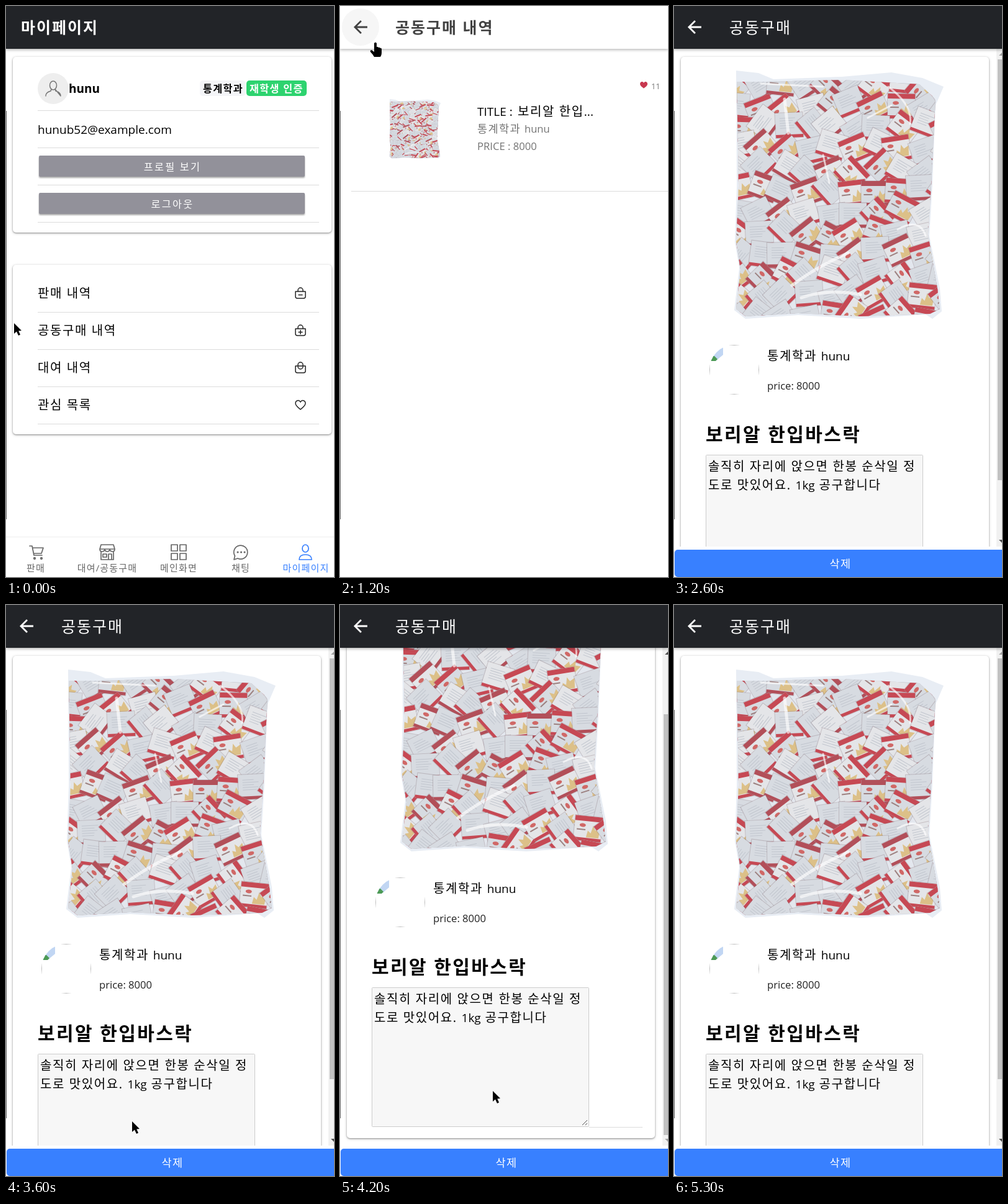
Animation, 528 px wide and 920 px high, one loop 6000 ms. Source, as an HTML page:

```html
<!DOCTYPE html>
<html lang="ko">
<head>
<meta charset="utf-8">
<title>마이페이지</title>
<style>
html, body { margin: 0; width: 100%; height: 100%; overflow: hidden; background: #fff; }
svg { display: block; font: 20px "Open Sans", "Noto Sans CJK KR", sans-serif; }
text { letter-spacing: .08em; white-space: pre; }
.l { font-size: .95em; letter-spacing: 0; }
.b { font-weight: 700; }
.m { text-anchor: middle; }
.btn { letter-spacing: .14em; font-size: 16.25px; fill: #fff; text-anchor: middle; }
.tab { font-size: 15px; text-anchor: middle; }
.card { fill: #fff; filter: drop-shadow(0 1px 1px #0005) drop-shadow(0 1px 2px #0003); }
.bar { filter: drop-shadow(0 2px 2px #0004); }
.grey { fill: #92919a; filter: drop-shadow(0 2px 1px #0005); }
.rule { stroke: #dcdcdc; fill: none; }
.icon { fill: none; stroke: #222; stroke-width: 1.5; stroke-linecap: round; stroke-linejoin: round; }
.tabs { stroke: #666; stroke-width: 1.7; }
</style>
</head>
<body>
<svg width="528" height="920" viewBox="0 0 528 920">
<defs>
  <clipPath id="bag"><path d="M101 122L150 122 270 119 395 126 421 150 414 290 409 368 424 455 428 488 412 496 300 500 200 495 115 500 100 488 107 425 100 380 104 290Z"/></clipPath>
  <clipPath id="round"><circle cx="97" cy="586" r="40"/></clipPath>
  <path id="heart" d="M0 13C-5 9-15 3-15-5C-15-15-4-17 0-9C4-17 15-15 15-5C15 3 5 9 0 13Z"/>
  <path id="back" d="M44 34H24M34 24L24 34L34 44" fill="none" stroke-width="2.8"/>
  <path id="sack" d="M-8-3H8V5Q8 8 5 8H-5Q-8 8-8 5ZM-4-3V-5A4 4 0 0 1 4-5V-3"/>
  <g id="photo">
    <path fill="#e8edf4" d="M100 104L136 108 160 118 270 114 350 107 400 116 434 130 421 160 416 290 411 370 428 455 431 492 416 504 405 497 300 504 200 498 115 504 97 490 105 422 98 380 101 290Z"/>
    <g clip-path="url(#bag)">
      <g id="packs"></g>
      <rect x="96" y="104" width="340" height="400" fill="#d3cfd4" opacity=".22"/>
    </g>
    <g fill="none" stroke="#fff" stroke-linecap="round" opacity=".65">
      <path stroke-width="5" d="M190 450Q230 420 280 398M205 470Q250 455 300 465M178 150L184 205"/>
      <path stroke-width="3" d="M345 130Q385 160 380 190M240 240L250 285M360 360Q395 340 405 370M140 125L240 130M312 180L350 160"/>
    </g>
  </g>
</defs>
<rect width="528" height="920" fill="#fff"/>

<g id="home">
  <rect class="bar" width="528" height="69" fill="#222428"/>
  <text class="b" x="24" y="44" font-size="25" fill="#fff">마이페이지</text>
  <rect class="card" x="11" y="82" width="513" height="283" rx="5"/>
  <rect class="card" x="11" y="417" width="513" height="273" rx="5"/>
  <path class="rule" d="M51 168.5H504M51 228.5H504M51 288.5H504M51 348.5H504M51 493.5H504M51 553.5H504M51 613.5H504M51 673.5H504"/>
  <circle cx="76" cy="133" r="25" fill="#eee"/>
  <g class="icon" style="stroke:#777"><ellipse cx="76" cy="128" rx="5.5" ry="7"/><path d="M64 145Q64 139 72 137L73 134M79 134L80 137Q88 139 88 145Z"/></g>
  <text class="b" x="101" y="140"><tspan class="l">hunu</tspan></text>
  <rect x="312" y="120" width="74" height="25" rx="5" fill="#f4f5f8"/>
  <rect x="387" y="120" width="97" height="25" rx="5" fill="#2dd36f"/>
  <text class="b" x="317" y="139" font-size="16.25">통계학과</text>
  <text class="b" x="392" y="139" font-size="16.25" fill="#fff">재학생 인증</text>
  <text x="51" y="206"><tspan class="l">hunub52@example.com</tspan></text>
  <rect class="grey" x="53" y="241" width="428" height="34" rx="2"/>
  <rect class="grey" x="53" y="301" width="428" height="34" rx="2"/>
  <text class="btn" x="268" y="265">프로필 보기</text>
  <text class="btn" x="268" y="325">로그아웃</text>
  <text x="51" y="470">판매 내역</text>
  <text x="51" y="530">공동구매 내역</text>
  <text x="51" y="590">대여 내역</text>
  <text x="51" y="650">관심 목록</text>
  <g class="icon">
    <g transform="translate(474 463)"><use href="#sack"/><path d="M-3 2.5H3"/></g>
    <g transform="translate(474 523)"><use href="#sack"/><path d="M-3 2.5H3M0-.5V5.5"/></g>
    <g transform="translate(474 583)"><use href="#sack"/><path d="M-4-2A4 4 0 0 0 4-2"/></g>
    <use href="#heart" transform="translate(474 643) scale(.53)" stroke-width="2.8"/>
  </g>
  <path class="rule" d="M0 855.5H528" style="stroke:#eee"/>
  <g class="icon tabs">
    <path d="M38 870H42L45 885H58M43 873H60L57 882H45"/><circle cx="46" cy="890" r="1.3"/><circle cx="57" cy="890" r="1.3"/>
    <path d="M153 868H173L175 875Q175 879 171.500 879T167 876Q166 879 163 879T159 876Q158 879 154.500 879T151 875ZM151 875H175M153 880V892H173V880M156 883H162V888H156ZM165 892V883H170V892"/>
    <path d="M266 868H276V878H266ZM280 868H290V878H280ZM266 882H276V892H266ZM280 882H290V892H280Z"/>
    <path d="M367 892L368.500 886A11 11 0 1 1 373 890Z"/>
    <path d="M373 880H373.100M378.500 880H378.600M384 880H384.100" stroke-width="3"/>
    <g stroke="#3880ff"><ellipse cx="482" cy="874" rx="5" ry="6"/><path d="M472 892Q472 884 482 884T492 892Z"/></g>
  </g>
  <g fill="#666">
    <text class="tab" x="48" y="911">판매</text>
    <text class="tab" x="163" y="911">대여/공동구매</text>
    <text class="tab" x="278" y="911">메인화면</text>
    <text class="tab" x="378" y="911">채팅</text>
    <text class="tab" x="483" y="911" fill="#3880ff">마이페이지</text>
  </g>
</g>

<g id="list">
  <rect width="528" height="920" fill="#fff"/>
  <rect class="bar" width="528" height="69" fill="#fff"/>
  <circle id="hover" cx="33" cy="34" r="30" fill="#f6f6f6"/>
  <use href="#back" stroke="#424242"/>
  <text class="b" x="89" y="44" font-size="25" fill="#424242">공동구매 내역</text>
  <use href="#heart" transform="translate(489 127.500) scale(.4)" fill="#c8384f"/>
  <text x="501" y="134" font-size="13.500" fill="#777"><tspan class="l">11</tspan></text>
  <use href="#photo" transform="translate(55.400 125) scale(.246 .24)"/>
  <text x="221" y="177"><tspan class="l">TITLE :</tspan></text>
  <text x="286" y="177">보리알 한입<tspan class="l">...</tspan></text>
  <g font-size="17.500" fill="#737373">
    <text x="221" y="204">통계학과 <tspan class="l">hunu</tspan></text>
    <text x="221" y="232"><tspan class="l">PRICE : 8000</tspan></text>
  </g>
  <path class="rule" d="M18 298.500H528"/>
</g>

<g id="detail">
  <rect width="528" height="960" fill="#fff"/>
  <g id="content">
    <rect class="card" x="11" y="82" width="496" height="884" rx="5"/>
    <use href="#photo"/>
    <g data-dy="6"><g clip-path="url(#round)">
      <path fill="#c1d6f3" d="M57 546H79V562L67 572H57Z"/>
      <path fill="#4c9a55" d="M57 572V564H65L70 569 67 572Z"/>
      <rect x="57.500" y="546.500" width="79" height="79" fill="none" stroke="#bbb"/>
    </g></g>
    <text data-dy="-3" x="150" y="571">통계학과 <tspan class="l">hunu</tspan></text>
    <text data-dy="2" x="150" y="618" font-size="17.500" fill="#222"><tspan class="l">price: 8000</tspan></text>
    <use id="like" href="#heart" x="315" y="610" fill="none" stroke="#111" stroke-width="2.800"/>
    <g data-dy="10">
      <text class="b" x="51" y="701" font-size="30">보리알 한입바스락</text>
      <rect x="51.500" y="723.500" width="349" height="224" rx="1" fill="#f7f7f7" stroke="#ccc"/>
      <text x="55" y="749">솔직히 자리에 앉으면 한봉 순삭일 정</text>
      <text x="55" y="779">도로 맛있어요. <tspan class="l">1kg</tspan> 공구합니다</text>
      <path d="M390 945L398 937M395 945L398 942" stroke="#555"/>
      <path class="rule" d="M401 948.500H487"/>
    </g>
  </g>
  <rect x="519" y="69" width="9" height="891" fill="#f1f1f1"/>
  <path id="up" d="M523 80L528 75V80Z"/>
  <path id="down" d="M523 860L528 865V860Z"/>
  <rect id="thumb" x="521" width="7" fill="#c1c1c1"/>
  <rect class="bar" width="528" height="69" fill="#222428"/>
  <use href="#back" stroke="#fff"/>
  <text x="89" y="44" font-size="25" fill="#fff">공동구매</text>
  <g id="footer">
    <rect y="871" width="528" height="49" fill="#fff"/>
    <rect x="1" y="876" width="532" height="44" rx="5" fill="#3880ff"/>
    <text class="m" x="268" y="905" font-size="17.500" fill="#fff">삭제</text>
  </g>
</g>

<rect y="169" width="1" height="658" fill="#666"/>
<g id="cursor">
  <path id="arrow" d="M0 0V17L4 13.500L7 20L10 18.500L7.200 12.500L12 12Z"/>
  <path id="hand" d="M-2 1Q0-2 2 1V7Q4 6 5 8Q7 7 8 9Q10 8 10 11V17Q10 20 8 23H-2Q-4 19-8 15Q-9 12-6 12L-2 15Z"/>
</g>
</svg>
<script>
const $ = id => document.getElementById(id);
const show = (id, on) => $(id).style.display = on ? '' : 'none';
const move = (el, x, y) => el.setAttribute('transform', `translate(${x} ${y})`);

// Snack packets: a jittered grid of small wrappers
let seed = 11;
const rnd = () => (seed = seed * 16807 % 2147483647) / 2147483647;
const rect = (x, y, w, h, fill) => `<rect x="${x}" y="${y}" width="${w}" height="${h}" fill="${fill}"/>`;
function packet(x, y) {
  const red = rnd() < .7 ? '#c3222f' : '#a92a36';
  const paper = rnd() < .6 ? '#d8dde4' : '#e9eaed';
  const turn = (rnd() - .5) * 110;
  let art = rect(-22, -20, 44, 40, paper);
  if (rnd() < .55) {
    art += rect(-22, -20, 44, 8, red) + rect(-22, 15, 44, 5, red)
      + '<path d="M-2 14L0 3 5 7 8-5 12 2 20-2 18 14Z" fill="#dfbb72"/>'
      + '<path d="M-18 2H-4" stroke="#8d6a68" stroke-width="2"/>'
      + '<ellipse cx="-9" cy="-5" rx="5" ry="3" fill="#cf4a47"/>';
  } else {
    art += rect(-22, 15, 44, 5, red);
    for (let i = 0; i < 5; i++) art += rect(-15, -12 + i * 4, 16 + rnd() * 12, 1, '#bcc2cb');
  }
  return `<g transform="translate(${x} ${y}) rotate(${turn})"><path d="M-23-21H23V21H-23Z" fill="#65454d" opacity=".3"/>${art}</g>`;
}
let packs = '';
for (let y = 128; y < 515; y += 34)
  for (let x = 105; x < 440; x += 37)
    packs += packet(x + (rnd() - .5) * 16, y + (rnd() - .5) * 16);
$('packs').innerHTML = packs;

// Keys are [time, ...values], joined by straight lines
function track(keys, t) {
  const i = keys.findIndex(k => k[0] > t);
  if (i < 0) return keys.at(-1).slice(1);
  const [t0, ...a] = keys[i - 1], [t1, ...b] = keys[i];
  return a.map((v, j) => v + (b[j] - v) * (t - t0) / (t1 - t0));
}
const pointer = [
  [0, 13, 511], [100, 24, 516], [500, 132, 523], [800, 132, 523], [900, 128, 450],
  [1200, 57, 59], [1400, 190, 190], [1500, 190, 190], [1900, 311, 213], [2100, 311, 213],
  [2600, 300, 930], [3100, 205, 930], [3200, 202, 886], [3300, 200, 870], [3400, 200, 870],
  [3600, 203, 832], [4200, 246, 783], [4700, 250, 790], [5000, 262, 930]
];
const listRise = [[0, 40], [600, 40], [700, 9], [800, 0]];
const detailRise = [[0, 40], [1900, 40], [2000, 27], [2100, 7], [2200, 0]];
const scrolling = [[0, 0], [3700, 0], [3800, 38], [3900, 84], [4000, 107], [4300, 107], [4400, 90], [4500, 48], [4600, 14], [4700, 0]];

function enter(id, keys, t) {
  const [y] = track(keys, t);
  show(id, y < 40);
  move($(id), 0, y);
  $(id).style.opacity = (1 - y / 40) ** .7;
}

function draw(now) {
  const t = Math.floor(now % 6000 / 100) * 100;
  enter('list', listRise, t);
  enter('detail', detailRise, t);

  const loading = t < 2400;
  show('like', loading);
  show('footer', !loading);
  document.querySelectorAll('[data-dy]').forEach(el => move(el, 0, loading ? el.dataset.dy : 0));

  const [scroll] = track(scrolling, t);
  move($('content'), 0, -scroll);
  $('thumb').setAttribute('y', 86 + scroll * 90 / 107);
  $('thumb').setAttribute('height', loading ? 724 : 678);
  $('up').setAttribute('fill', scroll > 0 ? '#505050' : '#a3a3a3');
  $('down').setAttribute('fill', scroll < 107 ? '#505050' : '#a3a3a3');
  show('down', !loading);

  const [x, y] = track(pointer, t);
  const onBack = y < 75;
  const hand = onBack || t < 700 && x > 51 || y > 876;
  move($('cursor'), x, y);
  show('hover', onBack);
  show('hand', hand);
  show('arrow', !hand);
}

const start = performance.now();
function tick() {
  draw(performance.now() - start);
  requestAnimationFrame(tick);
}
tick();
</script>
</body>
</html>
```
